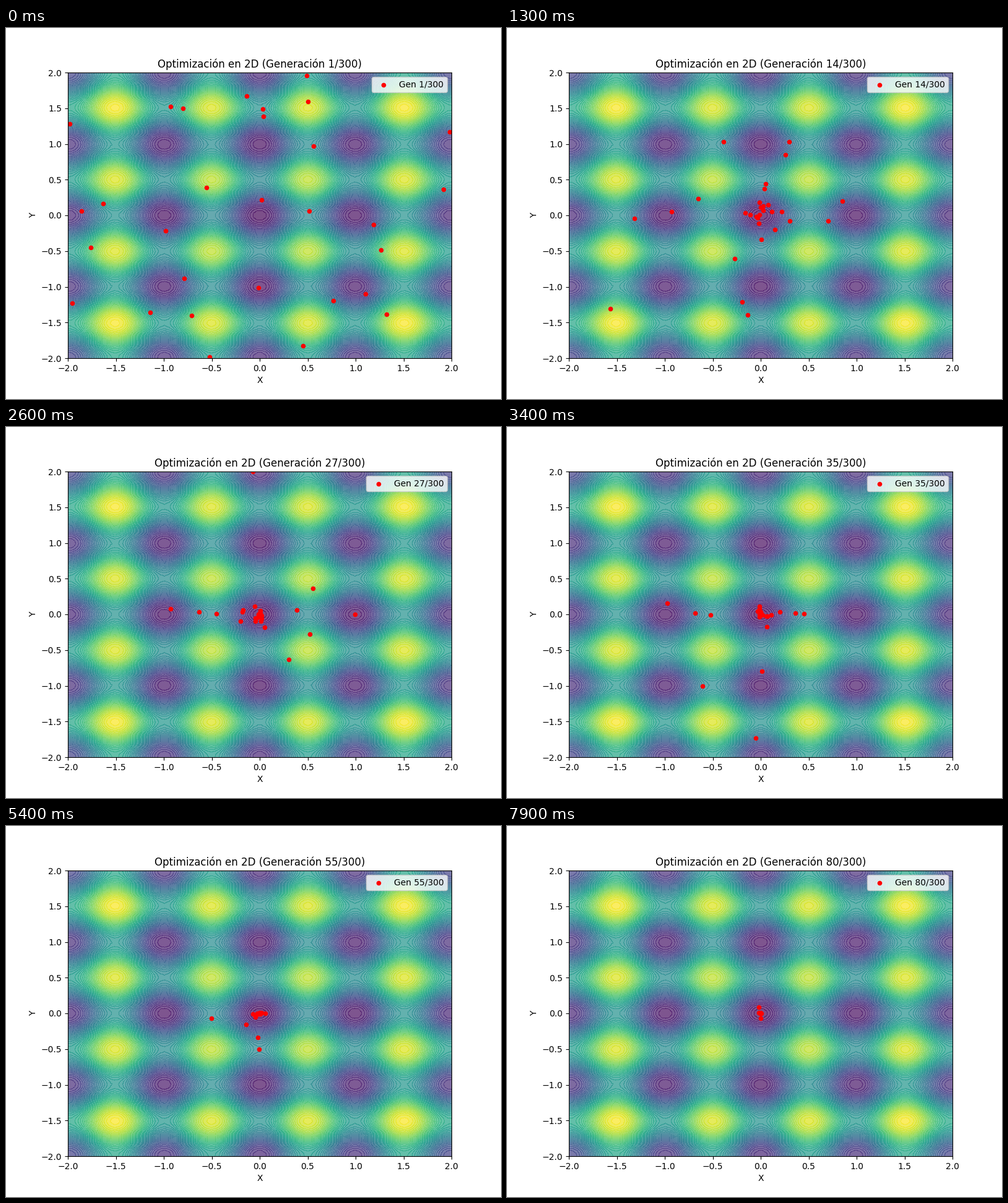
Recreate the animation shown at these times as a matplotlib script. Size 800 by 600 pixels, loop 8 s.

```python
import numpy as np
import matplotlib.pyplot as plt
from matplotlib.animation import FuncAnimation

FRAMES, TOTAL, SWARM, LIMIT = 80, 300, 30, 2
INERTIA, PULL = 0.7, 1.5


def rastrigin(x, y):
    return 20 + sum(v**2 - 10 * np.cos(2 * np.pi * v) for v in (x, y))


def simulate(seed=7):
    """Particle swarm: each one swings between its own best spot and the optimum."""
    rng = np.random.default_rng(seed)
    pos = rng.uniform(-LIMIT, LIMIT, (SWARM, 2))
    vel = rng.uniform(-1, 1, pos.shape)
    best, steps = pos.copy(), [pos]
    for _ in range(FRAMES - 1):
        own, shared = rng.random((2, *pos.shape))
        vel = INERTIA * vel + PULL * (own * (best - pos) - shared * pos)
        pos = np.clip(pos + vel, -LIMIT, LIMIT)
        better = rastrigin(*pos.T) < rastrigin(*best.T)
        best[better] = pos[better]
        steps.append(pos)
    return steps


steps = simulate()

fig, ax = plt.subplots(figsize=(8, 6), dpi=100)
X, Y = np.meshgrid(*[np.linspace(-LIMIT, LIMIT, 100)] * 2)
ax.contourf(X, Y, rastrigin(X, Y), levels=50, cmap="viridis", alpha=0.7)
dots = ax.scatter(*steps[0].T, color="red", s=20)
ax.set(xlim=(-LIMIT, LIMIT), ylim=(-LIMIT, LIMIT), xlabel="X", ylabel="Y")


def update(i):
    count = f"{i + 1}/{TOTAL}"
    dots.set_offsets(steps[i])
    dots.set_label(f"Gen {count}")
    ax.set_title(f"Optimización en 2D (Generación {count})")
    ax.legend(loc="upper right")
    return [dots]


anim = FuncAnimation(fig, update, frames=FRAMES, interval=100, repeat=True, repeat_delay=0)
plt.show()
```
